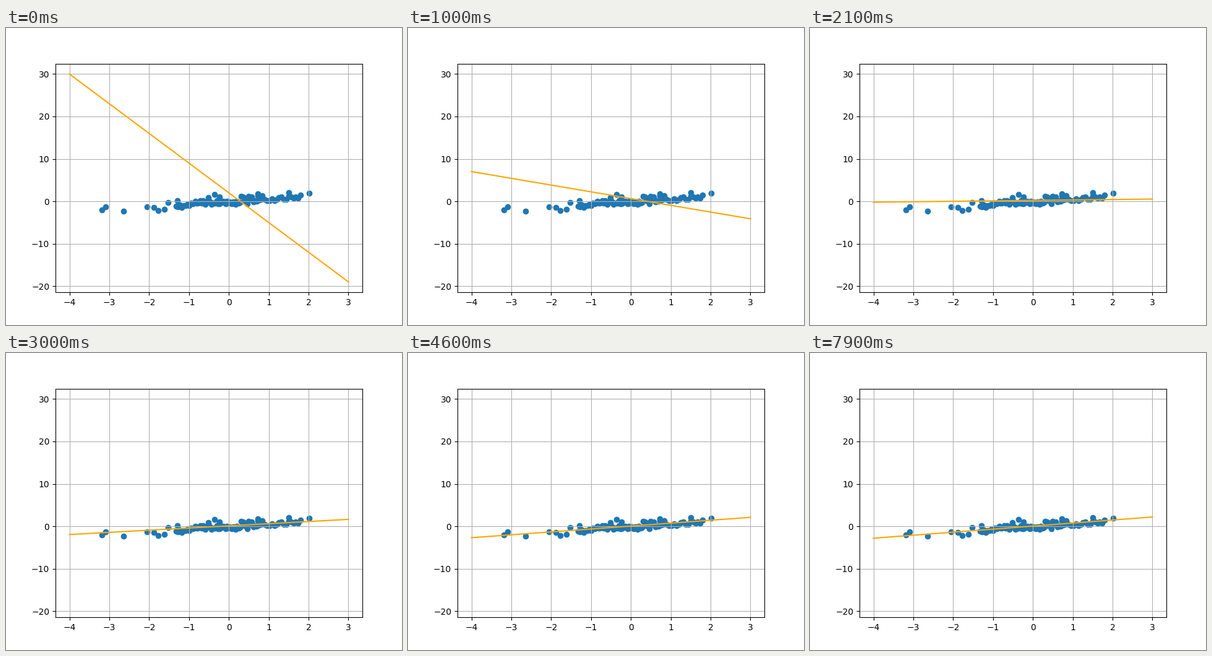
These frames come from a looping animation (640x480 px, 8 s). A matplotlib script:

```python
import numpy as np
import matplotlib.pyplot as plt
from matplotlib.animation import FuncAnimation

FRAMES, INTERVAL = 80, 100

# Gradient descent on y = w*x + b, with GRAM = [[E[x*x], E[x]], [E[x], 1]].
START = np.array([-7.0, 2.0])
FIT = np.array([0.716, 0.053])
GRAM = np.array([[1.13, -0.03], [-0.03, 1.0]])
STEP = np.eye(2) - 0.1 * GRAM

rng = np.random.default_rng(4)


def band(start, end, spread, n):
    """Points along a segment, scattered vertically by up to spread."""
    pts = np.linspace(start, end, n)
    pts[:, 1] += spread * rng.uniform(-1, 1, n)
    return pts


def params(step):
    return FIT + np.linalg.matrix_power(STEP, step) @ (START - FIT)


outliers = [
    (-3.18, -2.0), (-3.09, -1.3), (-2.64, -2.3), (-2.05, -1.3),
    (-1.88, -1.45), (-1.77, -2.15), (-1.61, -1.9), (-1.52, -0.25),
    (-1.29, 0.15), (-0.51, 0.85), (-0.36, 1.6), (-0.23, 1.0),
    (0.73, 1.75), (1.51, 2.0), (2.02, 1.9),
]
cloud = np.vstack([
    outliers,
    band((-1.33, -1.4), (-0.9, -0.6), 0.35, 10),
    band((-0.84, -0.35), (0.2, -0.35), 0.5, 34),
    band((0.2, 0.3), (0.84, 0.4), 1.0, 18),
    band((0.9, 0.15), (1.8, 1.25), 0.45, 16),
])

fig, ax = plt.subplots(figsize=(6.4, 4.8), dpi=100)
ax.scatter(*cloud.T)
ax.grid()

xs = np.array([-4.0, 3.0])
line, = ax.plot(xs, START[0] * xs + START[1], color="orange")
ax.set_xlim(-4.35, 3.35)
ax.set_ylim(-21.45, 32.45)


def update(step):
    w, b = params(step)
    line.set_ydata(w * xs + b)
    return line,


anim = FuncAnimation(fig, update, frames=FRAMES, interval=INTERVAL,
                     repeat=True, repeat_delay=0)
plt.show()
```
